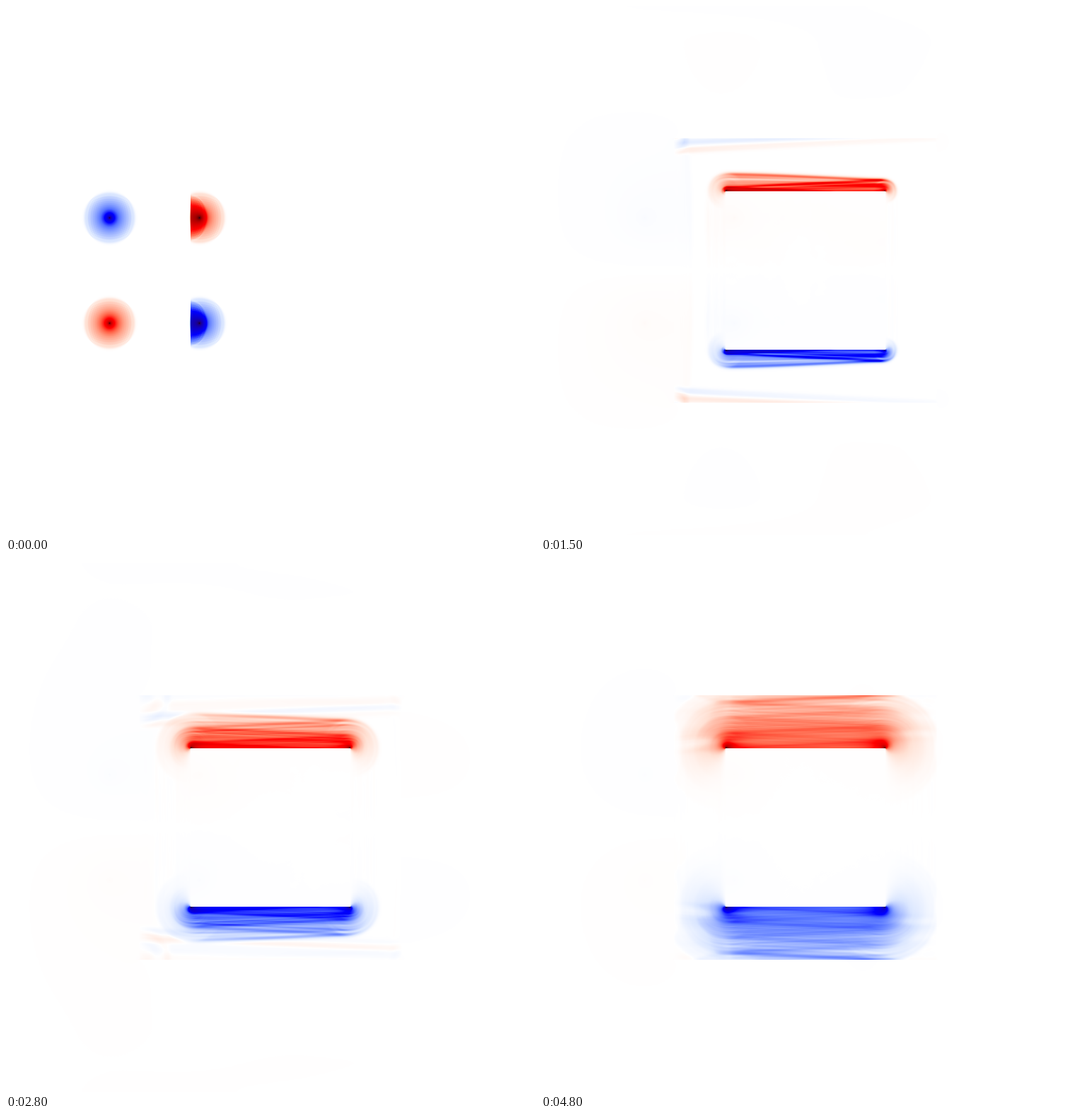
Animation of 748x748 px, one loop 4.9 s. Source, as a matplotlib script:

```python
import numpy as np
import matplotlib.pyplot as plt
from matplotlib.animation import FuncAnimation
from matplotlib.colors import LinearSegmentedColormap

# Solenoid switched on around a square magnetic core: the x component of B,
# found from the wave equation of the vector potential A.
SIZE, HALF = 748, 374
FRAMES, INTERVAL = 49, 100
STEPS = 54                   # time steps per frame
DT = 37.4 / STEPS            # light travels 37.4 px per frame
MU = 400
CORE_IN, CORE_OUT = 112.2, 187
COIL_TOP = 300
COILS = ((146, -1), (273, 1))  # column and direction of current
SPONGE = 58

STOPS = (0, .08, .18, .25, .34, .65, 1)
REDS = ((255, 255, 255), (255, 225, 212), (255, 160, 135), (255, 100, 72),
        (255, 0, 0), (130, 0, 0), (25, 0, 25))
BLUES = ((255, 255, 255), (218, 230, 255), (140, 165, 255), (85, 115, 255),
         (0, 0, 255), (30, 0, 130), (25, 0, 25))


def make_cmap():
    def side(sign, colors):
        return [(.5 + sign * s / 2, tuple(c / 255 for c in rgb))
                for s, rgb in zip(STOPS, colors)]
    return LinearSegmentedColormap.from_list(
        'field', side(-1, BLUES)[::-1] + side(1, REDS)[1:], N=2049)


def weight(y, x):
    """Squared step over permeability at the given points."""
    d = np.maximum(abs(x - HALF)[None, :], abs(y - HALF)[:, None])
    core = (d > CORE_IN) & (d < CORE_OUT)
    return np.where(core, DT**2 / MU, DT**2).astype(np.float32)


def damping(y, x):
    def depth(p):
        return np.clip((SPONGE - np.minimum(p, SIZE - p)) / SPONGE, 0, 1)
    d = np.maximum(depth(y)[:, None], depth(x)[None, :])
    keep = 1 - .3 * d**2
    keep[0] = keep[:, 0] = keep[:, -1] = 0
    return keep.astype(np.float32)


def simulate():
    """Upper half of Bx for every frame, scaled to its own peak."""
    y, x = np.arange(HALF + 1.), np.arange(SIZE) + .5
    wx = weight(y[:-1] + .5, x)
    wy = weight(y, x[:-1] + .5)
    keep = damping(y, x)
    a = np.zeros((HALF + 1, SIZE), np.float32)
    v = np.zeros_like(a)
    hx, hy = np.empty_like(wx), np.empty_like(wy)
    tx = np.empty((HALF - 1, SIZE), np.float32)
    ty = np.empty((HALF + 1, SIZE - 2), np.float32)
    fields = []
    for _ in range(FRAMES):
        for _ in range(STEPS):
            np.subtract(a[1:], a[:-1], out=hx)
            hx *= wx
            np.subtract(a[:, 1:], a[:, :-1], out=hy)
            hy *= wy
            np.subtract(hx[1:], hx[:-1], out=tx)
            np.subtract(hy[:, 1:], hy[:, :-1], out=ty)
            v[1:-1] += tx
            v[-1] -= 2 * hx[-1]          # mirror line
            v[:, 1:-1] += ty
            for col, sign in COILS:
                v[COIL_TOP:, col] += sign * DT**2
            v *= keep
            a += v
        bx = np.diff(a, axis=0)
        fields.append(bx / abs(bx).max())
    return fields


fields = simulate()

fig = plt.figure(figsize=(SIZE / 100, SIZE / 100), dpi=100)
ax = fig.add_axes([0, 0, 1, 1])
ax.axis('off')
image = ax.imshow(np.zeros((SIZE, SIZE)), cmap=make_cmap(), vmin=-1, vmax=1,
                  interpolation='nearest', aspect='auto')


def draw(i):
    top = fields[i]
    image.set_data(np.vstack((top, -top[::-1])))
    return image,


anim = FuncAnimation(fig, draw, frames=FRAMES, interval=INTERVAL,
                     repeat=True, repeat_delay=0, blit=False)
plt.show()
```
